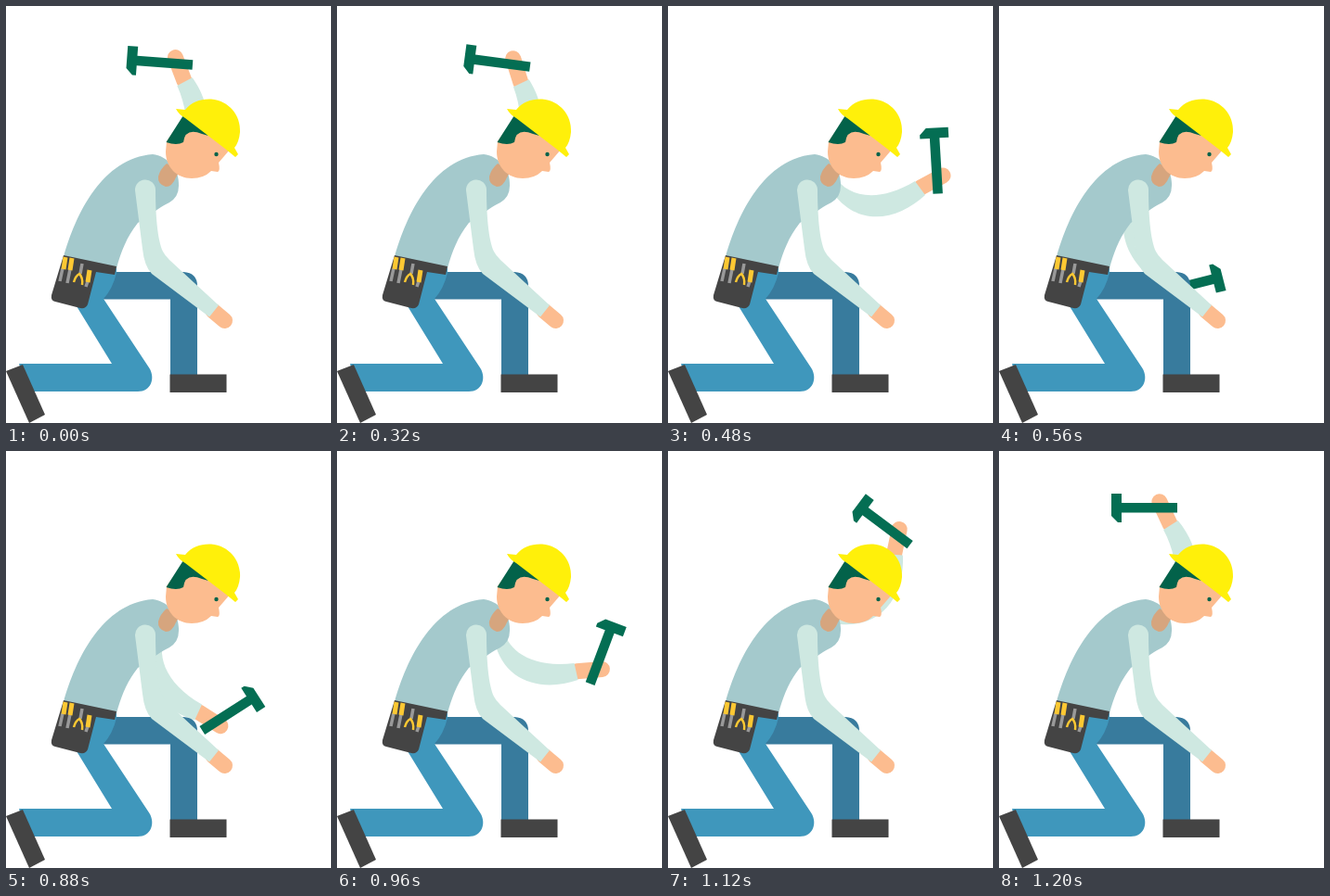
Write an HTML page that moves like this. It is 350 by 450 pixels and loops after 1.24 s.

```html
<!DOCTYPE html>
<html lang="en">
<head>
<meta charset="utf-8">
<title>Worker with hammer</title>
<style>
  html, body { margin: 0; width: 100%; height: 100%; overflow: hidden; background: #fff; }
  svg { display: block; width: 350px; height: 450px; }
  .skin { fill: #fcbc8f; }
  .neck { fill: #d6a57e; }
  .palm { fill: none; stroke: #fcbc8f; stroke-width: 17; stroke-linecap: round; }
  .sleeve { fill: #cee8e1; }
  .vest { fill: #a4c9cc; }
  .near-leg { fill: #3f97bc; }
  .far-leg { fill: #387b9d; }
  .leather { fill: #444; }
  .steel { fill: #046e53; }
  .hair { fill: #03624a; }
  .helmet { fill: #fff00a; }
  .metal { fill: none; stroke: #999; stroke-width: 3.5; }
  .grip { fill: none; stroke: #fdc833; stroke-width: 5; }
  .pliers { fill: none; stroke: #fdc833; stroke-width: 2.5; }
</style>
</head>
<body>
<svg viewBox="0 0 350 450">
  <!-- swinging arm, drawn level; the hammer is drawn fully raised -->
  <g id="arm">
    <path class="palm" d="M272 196L296 183"/>
    <path class="sleeve" d="M160 176L180 184C192 205 225 214 266 189L277 204C248 231 205 240 177 201L160 192Z"/>
    <path class="steel" transform="rotate(86.6 166.4 184.2)"
          d="M121 46H132V56H192V66.500H132V77H128L121 70Z"/>
  </g>

  <path class="far-leg" d="M100 287H191Q206 288 206 302V399H177V316.500H100Z"/>
  <path class="leather" d="M176.500 397.500H237.500V417H176.500Z"/>
  <path class="near-leg" d="M14 386H114L76 324L70 280H119V288Q115 305 105 316L154.500 391C161 402 156 416 142 416H24Z"/>
  <path class="leather" d="M0 394L18 387L42 441L25 450Z"/>

  <path class="vest" d="M62 271C75 224 104 164 158 160C174 162 187 176 186 194Q186 206 176 212Q166 217 160 222L142 234C130 249 124 265 119 283Z"/>
  <path class="neck" d="M173 170L187 178L183 185Q179 195 172 195Q163 192 164 184Q166 176 173 170Z"/>

  <path class="skin" d="M180 136L210 120L241 155L229 169Q231 178 228 179L221 178Q213 186 200 186C184 186 172 174 172 157L173 146Z"/>
  <circle class="hair" cx="226.500" cy="160" r="2.200"/>
  <path class="hair" d="M191 118L205 118L218 140L211 138Q193 131 191 147Q184 151 172.500 147Z"/>
  <path class="helmet" d="M183 111L193 112C200 103 210 100 221 100.500C240 102 253 118 252 136Q251 147 246 153L250 160L247 163L236 154L193 121Q186 117 183 111Z"/>

  <path class="leather" d="M62 269L119 281L117 290L97 287L88 322Q86 327 80 326L53 319Q48 318 49 312Z"/>
  <path class="metal" d="M61 283L58 297M69 284L66 299M82 278L80 289M88 297L86 303"/>
  <path class="grip" d="M64 271L62 284M71 272L69 285M90 285L88 298"/>
  <path class="pliers" d="M73 298Q75 291 79 289Q83 293 82 301"/>

  <path class="palm" d="M223 329L235.500 339.500"/>
  <path class="sleeve" d="M139 199A11 11 0 0 1 161 198C161 225 163 252 169 265Q171 269 176 274L229 323L219 335.500L157 289Q149 281 147 262Z"/>
</svg>
<script>
  const LOOP = 1240, STEP = 40;
  const LEVEL = 86.6;   // degrees from fully raised to level
  const REST = 4.2;     // waiting pose, just past fully raised
  const LOW = 165.7;    // hammer at the knee
  const arm = document.getElementById('arm');

  const clamp01 = v => Math.min(1, Math.max(0, v));

  // Accelerating strike, then a steady lift, in steps of 40 ms.
  function swing(time) {
    const n = Math.floor((time % LOOP) / STEP);
    if (n > 21) return LOW * (1 - (n - 21) / 9);
    return REST + (LOW - REST) * clamp01((n - 7) / 7) ** 2;
  }

  function draw() {
    const angle = swing(performance.now()) - LEVEL;
    arm.setAttribute('transform', `rotate(${angle} 166.4 184.2)`);
    requestAnimationFrame(draw);
  }
  draw();
</script>
</body>
</html>
```
